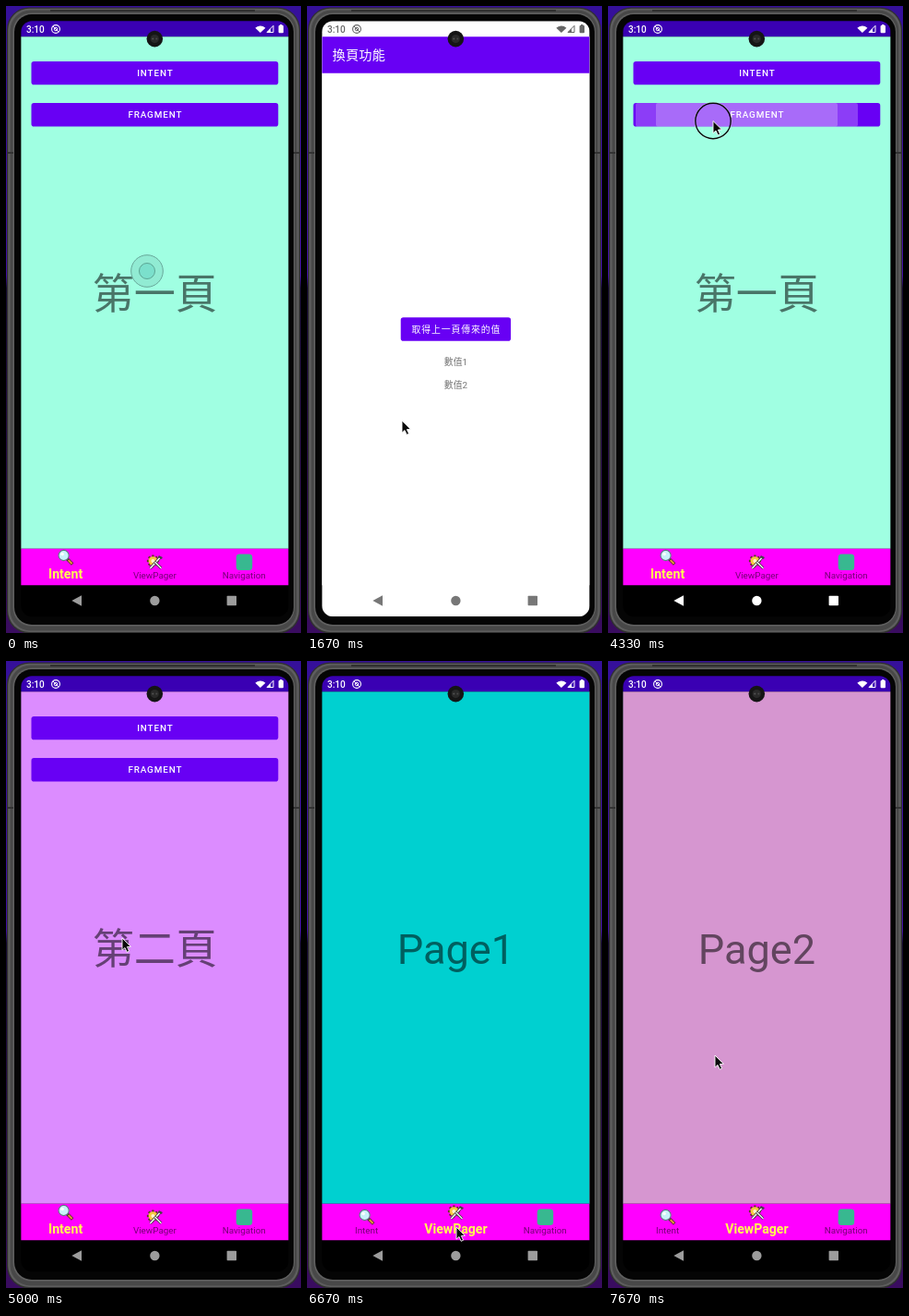
Recreate the animation shown at these times as an HTML page with a canvas. Size 320 by 679 pixels, loop 8000 ms.

```html
<!DOCTYPE html>
<html>
<head>
<meta charset="utf-8">
<style>
html, body { margin: 0; width: 100%; height: 100%; overflow: hidden; background: #1c0a50; }
canvas { display: block; width: 320px; height: 679px; }
</style>
</head>
<body>
<canvas id="stage"></canvas>
<script>
const canvas = document.getElementById('stage');
const c = canvas.getContext('2d');
const dpr = window.devicePixelRatio || 1;
canvas.width = 320 * dpr;
canvas.height = 679 * dpr;

const LOOP = 8000, STEPS = 24;
const PURPLE = '#6800f4', DARK = '#3a00b3';
const LATIN = 'Roboto, "Noto Sans CJK TC", "Noto Sans CJK", sans-serif';

// screen geometry, derived from the device's density-independent pixels
const DP = 0.7055;
const LEFT = 16.2, TOP = 16.2, WIDTH = 290.4, HEIGHT = 645;
const MID = LEFT + WIDTH / 2;
const PAGE_TOP = TOP + 24 * DP;
const NAV_TOP = TOP + HEIGHT - 48 * DP;
const TABS_TOP = NAV_TOP - 56 * DP;
const BUTTON_H = 36 * DP;

// cursor per step: x, y, pressed
const CURSOR = [
  null, [153, 287], [103, 90], [125, 72, 1], [125, 72], [103, 449],
  [84, 592], [81, 641, 1], [81.5, 640], [81.5, 640], [95, 356], [110, 175],
  [114, 123], [114, 124.5, 1], [114, 124], [126, 300], [138, 441], [150, 537],
  [162, 613, 1], [162, 612], [162, 613], [262, 430, 1], [116, 427, 1], [116, 427]
];

function rect(x, y, w, h, fill, r = 0) {
  c.beginPath();
  c.roundRect(x, y, w, h, r);
  c.fillStyle = fill;
  c.fill();
}

function disc(x, y, r, fill) {
  c.beginPath();
  c.arc(x, y, r, 0, 7);
  c.fillStyle = fill;
  c.fill();
}

function ring(x, y, r, color, width) {
  c.beginPath();
  c.arc(x, y, r, 0, 7);
  c.strokeStyle = color;
  c.lineWidth = width;
  c.stroke();
}

function poly(points, fill) {
  c.beginPath();
  points.forEach(([x, y]) => c.lineTo(x, y));
  c.closePath();
  c.fillStyle = fill;
  c.fill();
}

function line(x1, y1, x2, y2, color, width) {
  c.beginPath();
  c.moveTo(x1, y1);
  c.lineTo(x2, y2);
  c.strokeStyle = color;
  c.lineWidth = width;
  c.stroke();
}

function text(s, x, y, size, color, { weight = 400, align = 'center', spacing = 0 } = {}) {
  c.font = `${weight} ${size}px ${LATIN}`;
  c.textAlign = align;
  c.letterSpacing = spacing + 'px';
  c.fillStyle = color;
  c.fillText(s, x + (align === 'center' ? spacing / 2 : 0), y);
  c.letterSpacing = '0px';
}

function button(s, y, w, ripples = []) {
  rect(MID - w / 2, y, w, BUTTON_H, PURPLE, 4 * DP);
  ripples.forEach(([left, right]) => rect(left, y, right - left, BUTTON_H, 'rgba(255,255,255,.24)', 2));
  text(s, MID, y + 16.4, 14 * DP, '#fff', { weight: 500, spacing: 0.88 });
}

function phone() {
  const sky = c.createLinearGradient(0, 0, 0, 679);
  sky.addColorStop(0, '#35109a');
  sky.addColorStop(0.43, '#4410a8');
  sky.addColorStop(0.45, '#140a30');
  sky.addColorStop(1, '#3a0c60');
  rect(0, 0, 320, 679, sky);
  rect(1, 1.5, 318, 678, '#303030', 24);
  rect(2.2, 2.7, 315.6, 675.3, '#5e5e5e', 23);
  rect(4.5, 4.5, 311, 672, '#484848', 22);
  rect(7.5, 7.5, 305.5, 664, '#606060', 20);
  rect(9, 9, 303, 661, '#050505', 19);
  rect(48, 4, 222, 2, '#303030');
  rect(2, 158, 6, 2, '#333');
  rect(312, 158, 6, 2, '#333');
}

function magnifier(x, y) {
  line(x + 2, y + 2, x + 7.5, y + 7.5, '#40302a', 3.4);
  line(x + 3, y + 3, x + 7, y + 7, '#e89038', 2);
  disc(x - 2, y - 2, 5.8, '#c8f2fa');
  ring(x - 2, y - 2, 5.6, '#5f7480', 1.1);
  disc(x - 3.5, y - 3.5, 1.8, '#fff');
}

function tools(x, y) {
  for (let i = 0; i < 8; i++) {
    const a = i * Math.PI / 4;
    line(x - 2, y - 1, x - 2 + 6.5 * Math.cos(a), y - 1 + 6.5 * Math.sin(a), '#5c3a20', 2.4);
  }
  disc(x - 2, y - 1, 4.8, '#f8c840');
  disc(x - 2, y - 1, 2, '#fff4d0');
  line(x - 5, y + 7, x + 6, y - 5, '#333', 3);
  line(x - 5, y + 7, x + 6, y - 5, '#f0f0f0', 1.7);
  line(x, y, x + 7, y + 7, '#333', 3);
  line(x, y, x + 7, y + 7, '#e8e8e8', 1.7);
  line(x + 4, y - 6, x + 8, y - 4, '#444', 2);
}

function tile(x, y) {
  rect(x - 8.5, y - 8.5, 17.5, 17.5, '#38b890', 3.5);
}

function tabs(active) {
  rect(LEFT, TABS_TOP, WIDTH, NAV_TOP - TABS_TOP, '#f0f');
  [['Intent', magnifier], ['ViewPager', tools], ['Navigation', tile]]
    .forEach(([label, icon], i) => {
      const on = i === active;
      const x = MID + (i - 1) * WIDTH / 3;
      icon(x, on ? 597 : 602);
      text(label, x, on ? 619.7 : 620, (on ? 20 : 14) * DP, on ? '#ffff50' : 'rgba(0,0,0,.54)',
        { weight: on ? 700 : 400 });
    });
}

function bigText(s, x) {
  text(s, x, 328, 64 * DP, 'rgba(0,0,0,.54)');
}

function home(label, bg, k) {
  const w = WIDTH - 32 * DP, first = PAGE_TOP + 38 * DP;
  rect(LEFT, PAGE_TOP, WIDTH, TABS_TOP - PAGE_TOP, bg);
  button('INTENT', first, w, k === 4 ? [[28, 295]] : []);
  button('FRAGMENT', first + 64 * DP, w, k === 13 ? [[30, 271], [52, 249]] : []);
  bigText(label, MID);
  tabs(0);
}

function pager(shift) {
  ['#00d0d0', '#d696d0'].forEach((bg, i) => {
    const x = i * WIDTH - shift;
    rect(LEFT + x, PAGE_TOP, WIDTH, TABS_TOP - PAGE_TOP, bg);
    bigText('Page' + (i + 1), MID + x);
  });
  tabs(1);
}

function valuesPage() {
  rect(LEFT, PAGE_TOP, WIDTH, NAV_TOP - PAGE_TOP, '#fff');
  rect(LEFT, PAGE_TOP, WIDTH, 56 * DP, PURPLE);
  text('換頁功能', LEFT + 16 * DP, 58.2, 20 * DP, '#fff', { weight: 500, align: 'left', spacing: 0.3 });
  button('取得上一頁傳來的值', 337.3, 119.4);
  text('數值1', MID, 388.5, 14 * DP, '#757575');
  text('數值2', MID, 413.5, 14 * DP, '#757575');
}

function statusIcons(color) {
  text('3:10', 22, 28.6, 10, color, { weight: 500, align: 'left' });
  ring(54, 25, 4.4, color, 1.1);
  ring(54, 25, 1.8, color, 1);
  line(51, 22, 57, 28, color, 1);
  c.beginPath();
  c.moveTo(275.9, 29);
  c.arc(275.9, 29, 7.6, -Math.PI * 0.76, -Math.PI * 0.24);
  c.fillStyle = color;
  c.fill();
  c.beginPath();
  c.moveTo(283, 28.5);
  c.lineTo(290, 28.5);
  c.lineTo(290, 21.3);
  c.closePath();
  c.strokeStyle = color;
  c.lineWidth = 1;
  c.stroke();
  poly([[283, 28.5], [287, 28.5], [287, 24.4]], color);
  rect(295.6, 21, 5.4, 8.3, color, 1);
  rect(297, 20, 2.5, 2, color);
}

function navIcons(color) {
  poly([[71.3, 644], [82, 638.2], [82, 649.8]], color);
  disc(161.4, 644, 5.2, color);
  rect(239.6, 638.8, 10.4, 10.4, color, 0.8);
}

function pointer([x, y, pressed]) {
  if (pressed) {
    ring(x, y, 20, 'rgba(255,255,255,.4)', 1);
    ring(x, y, 19.2, '#0a0a0a', 1.4);
  }
  const arrow = [[0, 0], [0, 13.2], [3, 10.5], [5.2, 15.3], [7.6, 14.2], [5.4, 9.6], [9.4, 9.3]]
    .map(([dx, dy]) => [x + dx, y + dy]);
  poly(arrow, '#0a0a0a');
  c.strokeStyle = '#fff';
  c.lineWidth = 0.9;
  c.stroke();
}

function draw(k) {
  c.setTransform(dpr, 0, 0, dpr, 0, 0);
  phone();

  c.save();
  c.beginPath();
  c.roundRect(LEFT, TOP, WIDTH, HEIGHT, 12);
  c.clip();
  const opening = k === 5;
  rect(LEFT, TOP, WIDTH, HEIGHT, opening ? '#fff' : '#000');

  c.save();
  if (k === 8) {
    // returning page is still slightly enlarged
    c.translate(MID, 338);
    c.scale(1.0065, 1.0065);
    c.translate(-MID, -338);
  }
  if (!opening) rect(LEFT, TOP - 2, WIDTH, PAGE_TOP - TOP + 2, DARK);
  if (k >= 5 && k <= 7) valuesPage();
  else if (k < 14) home('第一頁', '#a0ffe2', k);
  else if (k < 20) home('第二頁', '#dc8cff', k);
  else pager(k < 22 ? 0 : k === 22 ? WIDTH / 2 : WIDTH);
  c.restore();

  statusIcons(opening ? '#666' : '#fff');
  const lit = k === 4 || (k >= 6 && k < 15);
  navIcons(opening ? '#777' : lit ? '#fff' : '#9c9c9c');
  c.restore();

  disc(161.3, 35.6, 8.8, '#151515');
  disc(161.3, 35.6, 4.6, '#292929');
  disc(159.3, 35.6, 1, '#555');
  disc(163.3, 35.6, 1, '#484848');

  if (k === 0) {
    disc(153, 287, 17.5, 'rgba(110,190,175,.3)');
    ring(153, 287, 17.3, '#69a89a', 1);
    disc(153, 287, 8.5, '#7be0cc');
    ring(153, 287, 8.5, '#5ca594', 1);
  }
  if (CURSOR[k]) pointer(CURSOR[k]);
}

function tick(now) {
  draw(Math.floor((now % LOOP + 3.5) * STEPS / LOOP) % STEPS);
  requestAnimationFrame(tick);
}
draw(0);
requestAnimationFrame(tick);
</script>
</body>
</html>
```
